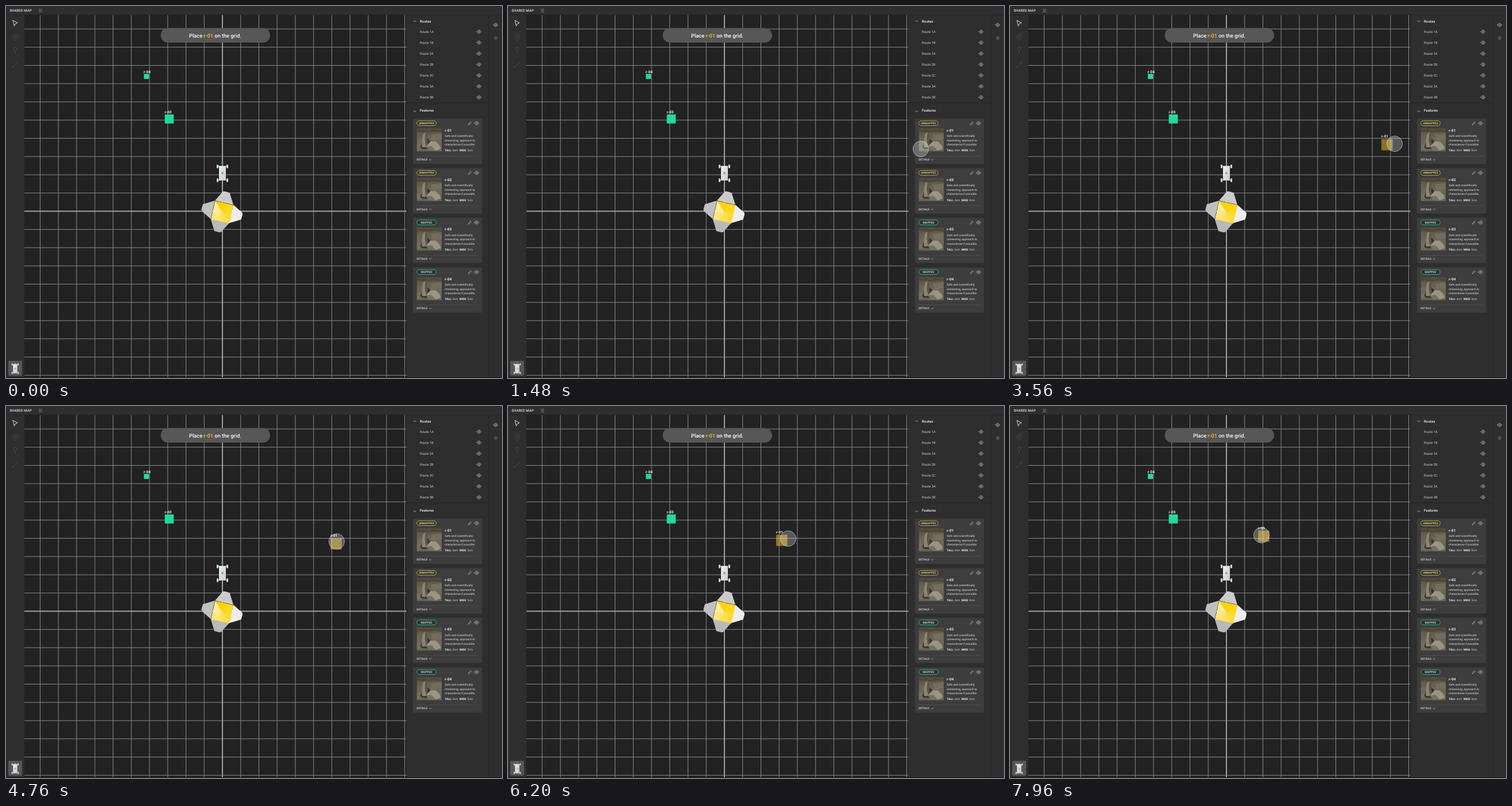
Animation, 864 px wide and 648 px high, one loop 8000 ms. Source, as an HTML page:

```html
<!DOCTYPE html>
<html lang="en">
<head>
<meta charset="utf-8">
<title>Shared map</title>
<style>
html, body { margin: 0; width: 100%; height: 100%; overflow: hidden; background: #222; }
svg { display: block; width: 100vw; height: 100vh; }
text { font-family: Roboto, "Open Sans", sans-serif; fill: #e2e2e2; text-rendering: geometricPrecision; white-space: pre; }
.line { fill: none; stroke-linecap: round; stroke-linejoin: round; }
.b { font-weight: 700; fill: #f4f4f4; }
.deck {
  width: 100%; height: 100%;
  background: conic-gradient(from -45deg, #ffd000, #ffd61c 25%, #fddc45 50%, #fde67c 75%, #fff0a6);
}
</style>
</head>
<body>
<svg id="stage" viewBox="0 0 864 648" xmlns="http://www.w3.org/2000/svg">
  <defs>
    <linearGradient id="body" x1="0" y1="0" x2="1" y2="1">
      <stop offset="0" stop-color="#f0f0f0"/><stop offset="1" stop-color="#cacaca"/>
    </linearGradient>
    <linearGradient id="soil" x1="0" y1="0" x2="0" y2="1">
      <stop offset="0" stop-color="#514b3c"/><stop offset=".22" stop-color="#625b4c"/>
      <stop offset=".55" stop-color="#6f6858"/><stop offset="1" stop-color="#696252"/>
    </linearGradient>
    <clipPath id="photoClip"><rect width="43.5" height="40.5"/></clipPath>
    <path id="petal" d="M-12.3-19.700L1.700-35.500L5-35.700L13.300-33.300L19.700-12.300Z"/>

    <g id="eye" class="line" stroke="#c4c4c4" stroke-width=".7">
      <path d="M-3.800 0Q0-6 3.800 0Q0 6-3.800 0Z"/><circle r="1.200"/>
    </g>
    <path id="chevron" class="line" stroke="#c9c9c9" stroke-width=".9" d="M-2-1L0 1L2-1"/>
    <path id="pencil" class="line" stroke="#c0c0c0" stroke-width=".7" d="M-2.600 2.600L-2 .8L1.400-2.600L2.600-1.400L-.8 2Z"/>
    <g id="rover">
      <path class="line" stroke="#bdbdbd" stroke-width="1" d="M-8-11.500H8M-8 12.500H8M0-12V-15"/>
      <g fill="#d6d6d6">
        <rect x="-10" y="-14.500" width="3" height="6"/><rect x="7" y="-14.500" width="3" height="6"/>
        <rect x="-10" y="9.500" width="3" height="6"/><rect x="7" y="9.500" width="3" height="6"/>
      </g>
      <rect x="-6" y="-12.500" width="12" height="25.500" fill="url(#body)"/>
      <path class="line" stroke="#555" stroke-width=".8" d="M-1.600-1.800L1.600 1.800M1.600-1.800L-1.600 1.800"/>
      <path fill="#2f8fd0" d="M-2.400-17.500H2.400L0-13.500Z"/>
    </g>
    <g id="photo" clip-path="url(#photoClip)">
      <rect width="43.500" height="40.500" fill="url(#soil)"/>
      <path fill="#454033" opacity=".6" d="M0 3L12 2L20 4L31 2L43.500 4V7L30 6L18 8L0 6Z"/>
      <path fill="#7d7666" opacity=".6" d="M24 11L43.500 9V19L28 21ZM0 28L9 26L14 36L0 38Z"/>
      <path fill="#38342b" d="M6 33L9 24L18 17L23 22L25 27L19 36L9 36Z"/>
      <path fill="#8b8577" d="M11 10L15 7L19 9L18 19L19 28L15 33L9 33L9 23Z"/>
      <path fill="#5b5548" d="M15 7L19 9L18 19L19 28L16 31L14 20Z"/>
      <path fill="#9a9484" d="M16 32L24 23L33 23L40 30L42 36L33 39L21 38Z"/>
      <path fill="#777060" d="M16 32L26 31L33 39L21 38Z"/>
    </g>
  </defs>

  <rect width="864" height="648" fill="#222"/>
  <path id="grid" class="line" stroke="#8c8c8c" stroke-width="1"/>
  <path class="line" stroke="#a0a0a0" stroke-width="2" d="M377 15V648M32 357.500H698"/>

  <g fill="#20dc98">
    <rect x="240.200" y="118.300" width="9" height="8.800"/>
    <rect x="276.600" y="188.900" width="15.600" height="15.700"/>
  </g>
  <text class="b" font-size="6.400" x="239.800" y="117.200">r-04</text>
  <text class="b" font-size="6.400" x="276.400" y="187.400">r-03</text>
  <use href="#rover" x="377" y="291"/>

  <g transform="translate(376.300 358.600)">
    <use href="#petal" fill="#cbcbcb"/>
    <use href="#petal" fill="#ededed" transform="rotate(90)"/>
    <use href="#petal" fill="#b9b9b9" transform="rotate(180)"/>
    <use href="#petal" fill="#c0c0c0" transform="rotate(270)"/>
    <foreignObject x="-16.500" y="-16.500" width="33" height="33" transform="rotate(13)">
      <div xmlns="http://www.w3.org/1999/xhtml" class="deck"></div>
    </foreignObject>
  </g>

  <rect x="269.500" y="38.300" width="190.500" height="25.400" rx="12.700" fill="#575757"/>
  <text x="364.500" y="54.500" font-size="9.200" font-weight="500" text-anchor="middle" style="fill:#fff">Place <tspan fill="#f1c232">r-01</tspan> on the grid.</text>

  <g id="ghost">
    <rect x="-9.800" y="-9.800" width="19.600" height="19.600" fill="#f2c12e" fill-opacity=".5"/>
    <text class="b" x="-9.800" y="-12.300" font-size="6.300">r-01</text>
  </g>

  <g fill="#2e2e2e">
    <rect width="864" height="15.500"/>
    <rect width="32" height="648"/>
    <rect x="697.500" width="166.500" height="648"/>
  </g>
  <path class="line" stroke="#222" stroke-width="1" d="M0 15.500H864M698 168.500H841M841 15V648"/>
  <rect y="646.800" width="864" height="1.200" fill="#20191c"/>

  <text x="6.300" y="10.300" font-size="6.150" font-weight="500">SHARED MAP</text>
  <path class="line" stroke="#9a9a9a" stroke-width=".7" d="M57.500 5.700H62.500M57.500 8H62.500M57.500 10.300H62.500"/>

  <path class="line" stroke="#ddd" stroke-width="1" d="M12.300 25L20 29.500L16.600 30.700L14.600 34.500Z"/>
  <g class="line" stroke="#494949" stroke-width=".9">
    <circle cx="16" cy="54" r="5"/><path d="M13.500 54H18.500M16 51.500V56.500"/>
    <circle cx="16" cy="75" r="2.900"/><path d="M16 78V82.500"/>
    <path d="M12.500 105.300L19.500 98.300"/><circle cx="12" cy="106" r=".8"/><circle cx="20" cy="98" r=".8"/>
  </g>
  <rect x="4" y="618" width="24" height="26" rx="1.500" fill="#565656"/>
  <use href="#rover" transform="translate(16 631.500) scale(.62)"/>

  <use href="#eye" x="853" y="33"/>
  <path fill="#4c4c4c" d="M853 51.500L857 56L853 60.500L849 56Z"/>
  <use href="#chevron" x="712" y="26.500"/>
  <use href="#chevron" x="712" y="183.500"/>
  <text class="b" x="721" y="28.700" font-size="6.200" style="font-weight:500">Routes</text>
  <text class="b" x="721" y="183.600" font-size="6.200" style="font-weight:500">Features</text>
  <g id="routes"></g>
  <g id="cards"></g>

  <circle id="cursor" r="13.600" fill="#fff" stroke="#fff" stroke-opacity=".55" stroke-width=".9"/>
</svg>
<script>
const el = id => document.getElementById(id);
const LOOP = 8000, STEP = 40;

function gridPath() {
  const gap = 31.75;
  let d = "";
  for (let i = -10; i <= 10; i++) {
    if (!i) continue;
    const x = 377 + i * gap, y = 357.5 + i * gap;
    d += `M${x} 15V648`;
    if (y < 648) d += `M32 ${y}H698`;
  }
  return d;
}

const route = (name, i) => {
  const y = 44.7 + i * 19.05;
  return `<text x="721" y="${y + 2.1}" font-size="5.9" style="fill:#c8c8c8">Route ${name}</text>
    <use href="#eye" x="824" y="${y}"/>`;
};

function card(name, i) {
  const mapped = i > 1;
  const note = ["Safe and scientifically", "interesting, approach to", "characterize if possible."];
  return `<g transform="translate(709 ${196 + i * 86.4})">
    <rect width="120.3" height="79" rx="1.5" fill="#3d3d3d"/>
    <rect x="6.7" y="4" width="33.6" height="8.4" rx="4.2" fill="#303030"
      stroke="${mapped ? "#29c891" : "#e0b930"}" stroke-width=".9"/>
    <text x="23.5" y="10" font-size="4.95" font-weight="500" text-anchor="middle">${mapped ? "MAPPED" : "UNMAPPED"}</text>
    <use href="#pencil" x="99" y="8.3"/>
    <use href="#eye" x="110.7" y="8.3"/>
    <use href="#photo" x="6.5" y="17"/>
    <text class="b" x="55.3" y="22.6" font-size="6.3">${name}</text>
    ${note.map((s, k) => `<text x="55.3" y="${32 + k * 7.5}" font-size="5.05">${s}</text>`).join("")}
    <text x="55.3" y="57.3" font-size="4.8"><tspan class="b">TALL:</tspan> 4cm  <tspan class="b">WIDE:</tspan> 5cm</text>
    <path class="line" stroke="#555" stroke-width=".7" d="M6.5 65.5H114.5"/>
    <text x="6.3" y="73.3" font-size="4.85" font-weight="500">DETAILS</text>
    <use href="#chevron" transform="translate(29.8 71.8) scale(.85)"/>
  </g>`;
}

el("grid").setAttribute("d", gridPath());
el("routes").innerHTML = ["1A", "1B", "2A", "2B", "2C", "3A", "3B"].map(route).join("");
el("cards").innerHTML = ["r-01", "r-02", "r-03", "r-04"].map(card).join("");

// Keys are [time, x, y].
const cursorKeys = [
  [760, 860, -4], [1000, 812, 130], [1290, 738, 264], [1480, 719, 249], [1580, 717, 241],
  [1780, 731, 224], [2000, 753, 234], [2200, 746, 252], [2400, 737, 238.6], [2800, 737, 238.6],
  [3560, 670, 240], [3640, 661.5, 240], [4480, 600.5, 237.5], [4760, 576, 236], [5320, 542, 230.5],
  [5700, 517, 227.5], [6200, 488, 231], [6600, 459, 226.5], [7000, 436.5, 227],
  [7300, 434.3, 224], [7840, 438, 225]
];
const ghostKeys = [
  [2840, 705.6, 242], [3560, 656.8, 241.7], [4760, 575, 240], [6200, 476.8, 234],
  [6700, 446, 231.6], [7000, 442, 230.2], [7960, 442, 226.8]
];

// Cubic through the keys; flat at turning points, so it never overshoots.
function slope(keys, i, c) {
  const a = keys[i - 1], b = keys[i], d = keys[i + 1];
  if (!a || !d) {
    const [p, q] = a ? [a, b] : [b, d];
    return (q[c] - p[c]) / (q[0] - p[0]);
  }
  if ((b[c] - a[c]) * (d[c] - b[c]) <= 0) return 0;
  return (d[c] - a[c]) / (d[0] - a[0]);
}

function along(keys, t) {
  const last = keys.length - 1;
  if (t <= keys[0][0]) return keys[0].slice(1);
  if (t >= keys[last][0]) return keys[last].slice(1);
  let i = 0;
  while (keys[i + 1][0] <= t) i++;
  const a = keys[i], b = keys[i + 1], h = b[0] - a[0], u = (t - a[0]) / h, v = 1 - u;
  return [1, 2].map(c =>
    v * v * (1 + 2 * u) * a[c] + u * v * v * h * slope(keys, i, c) +
    u * u * (3 - 2 * u) * b[c] - u * u * v * h * slope(keys, i + 1, c));
}

function place(node, keys, t) {
  node.setAttribute("visibility", t < keys[0][0] ? "hidden" : "visible");
  node.setAttribute("transform", `translate(${along(keys, t).join(" ")})`);
}

const cursor = el("cursor"), ghost = el("ghost");

function draw(t) {
  place(cursor, cursorKeys, t);
  place(ghost, ghostKeys, t);
  const pressed = t >= 2440 && t < 2600;
  cursor.setAttribute("fill-opacity", pressed ? 0.42 : 0.25);
}

const start = performance.now();
function tick() {
  const t = (performance.now() - start) % LOOP;
  draw(Math.floor(t / STEP) * STEP);
  requestAnimationFrame(tick);
}
draw(0);
requestAnimationFrame(tick);
</script>
</body>
</html>
```
